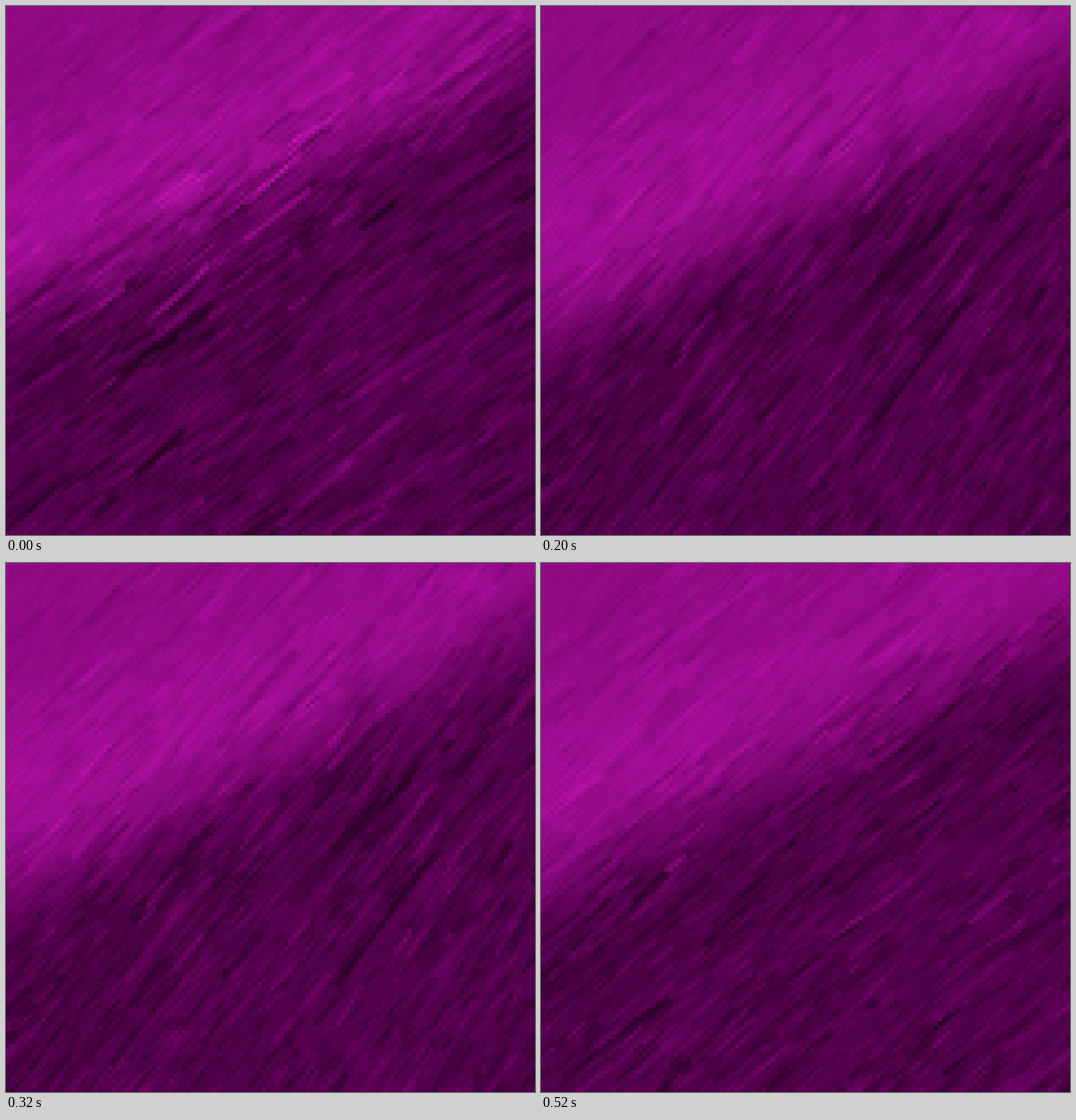
These frames come from a looping animation (600 px wide and 600 px high, 600 ms). An HTML page with a canvas:

```html
<!DOCTYPE html>
<html lang="en">
<head>
<meta charset="utf-8">
<title>Purple fur</title>
<style>
  html, body { margin: 0; width: 100%; height: 100%; overflow: hidden; background: #52004a; }
  canvas { display: block; width: 600px; height: 600px; image-rendering: pixelated; }
</style>
</head>
<body>
<canvas id="stage" width="120" height="120"></canvas>
<script>
const GRID = 120, CELL = 5, SIZE = GRID * CELL, HOLD = 200;

// left, right, bow: the line between lit and shaded fur; soft: half its blur
// angle, turn: hair direction in degrees, and its change towards the bottom right
// rough: extra contrast around the middle of the line
const poses = [
  { seed: 11, left: 355, right: 60, bow: 12, soft: 72, angle: 40, turn: -4, rough: 22,
    hairs: [{ x: 422, y: 238, length: 50, tone: -50 }, { x: 308, y: 237, length: 95, tone: 55 }] },
  { seed: 29, left: 378, right: 72, bow: 12, soft: 85, angle: 41, turn: 18, rough: 6,
    hairs: [{ x: 430, y: 405, length: 190, tone: -50 }, { x: 460, y: 285, length: 90, tone: 42 }] },
  { seed: 47, left: 365, right: 72, bow: 5, soft: 88, angle: 43, turn: -5, rough: 6,
    hairs: [{ x: 153, y: 341, length: 28, tone: 60 }, { x: 510, y: 390, length: 60, tone: 42 }] }
];

function random(seed) {
  return () => {
    seed = (seed + 0x6D2B79F5) | 0;
    let n = Math.imul(seed ^ (seed >>> 15), 1 | seed);
    n = (n + Math.imul(n ^ (n >>> 7), 61 | n)) ^ n;
    return ((n ^ (n >>> 14)) >>> 0) / 4294967296;
  };
}

const clamp = (n, lo, hi) => Math.max(lo, Math.min(hi, n));
const mix = (a, b, k) => a + (b - a) * k;
const bump = n => Math.exp(-n * n);

// Distance below the line between light and shade
function depth(pose, x, y) {
  const u = x / SIZE;
  return y - mix(pose.left, pose.right, u) - pose.bow * 4 * u * (1 - u);
}

function shade(pose, x, y) {
  const d = depth(pose, x, y);
  const k = clamp(d / pose.soft / 2 + 0.5, 0, 1);
  const lit = 145 + 18 * bump((d + 105) / 95) * (1 - x / 900);
  const dim = 83 - 6 * bump((d - 110) / 80);
  return mix(lit, dim, k * k * (3 - 2 * k));
}

function contrast(pose, x, y) {
  const d = depth(pose, x, y);
  const middle = bump(d / 110) * bump((x - 270) / 220);
  const base = mix(19, 31, clamp(d / 160 + 0.6, 0, 1));
  return (base + pose.rough * middle) * clamp((x + y) / 160, 0.2, 1);
}

function purple(v, alpha = 1) {
  v = Math.max(v, 28);
  const green = Math.max(0, (v - 85) * 0.2);
  return `rgba(${v | 0},${green | 0},${v * 0.92 | 0},${alpha})`;
}

function hair(ctx, pose, { x, y, length, tone }, alpha, width, sway = 0) {
  const tilt = pose.angle + pose.turn * (x + y) / (2 * SIZE) + sway;
  const a = tilt * Math.PI / 180;
  const dx = Math.cos(a) * length / 2, dy = Math.sin(a) * length / 2;
  ctx.strokeStyle = purple(shade(pose, x, y) + tone, alpha);
  ctx.lineWidth = width;
  ctx.beginPath();
  ctx.moveTo((x - dx) / CELL, (y + dy) / CELL);
  ctx.lineTo((x + dx) / CELL, (y - dy) / CELL);
  ctx.stroke();
}

function comb(ctx, pose, rnd, count, length, width) {
  for (let n = 0; n < count; n++) {
    const x = mix(-40, SIZE + 40, rnd()), y = mix(-40, SIZE + 40, rnd());
    const tone = (rnd() + rnd() - 1) * 2.2 * contrast(pose, x, y);
    const strand = { x, y, length: length * mix(0.4, 1.3, rnd()), tone };
    hair(ctx, pose, strand, mix(0.3, 0.7, rnd()), width, (rnd() - 0.5) * 12);
  }
}

function paint(pose) {
  const canvas = document.createElement("canvas");
  canvas.width = canvas.height = GRID;
  const ctx = canvas.getContext("2d");
  const rnd = random(pose.seed);

  for (let j = 0; j < GRID; j++) {
    for (let i = 0; i < GRID; i++) {
      ctx.fillStyle = purple(shade(pose, (i + 0.5) * CELL, (j + 0.5) * CELL));
      ctx.fillRect(i, j, 1, 1);
    }
  }

  comb(ctx, pose, rnd, 260, 120, 1.8);
  comb(ctx, pose, rnd, 1900, 55, 0.9);
  comb(ctx, pose, rnd, 1200, 22, 0.8);
  for (const strand of pose.hairs) hair(ctx, pose, strand, 0.8, 1.1);
  return canvas;
}

const pictures = poses.map(paint);
const stage = document.getElementById("stage").getContext("2d");
const start = performance.now();

function draw() {
  const time = performance.now() - start;
  stage.drawImage(pictures[Math.floor(time / HOLD) % pictures.length], 0, 0);
  requestAnimationFrame(draw);
}
draw();
</script>
</body>
</html>
```
